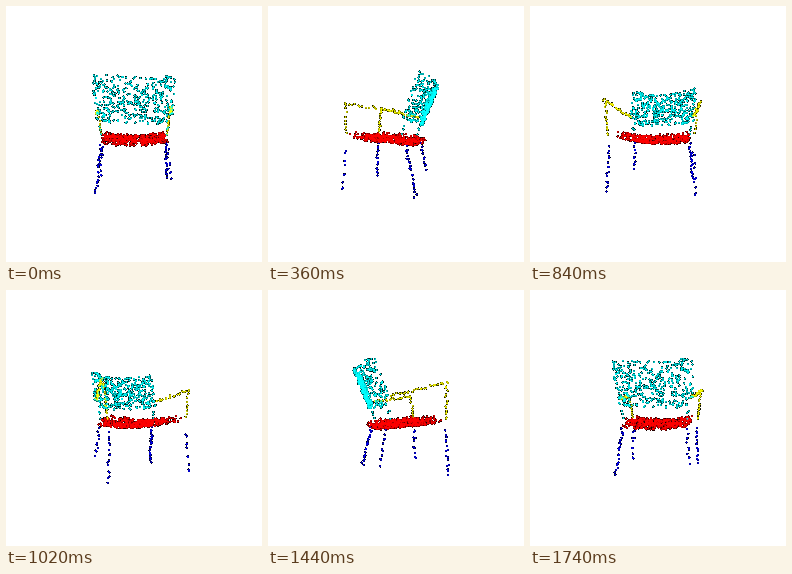
A matplotlib script that plays this animation: 256x256 px, repeating every 1.8 s.

```python
import numpy as np
import matplotlib.pyplot as plt
from matplotlib.animation import FuncAnimation

SIZE, FRAMES, STEP = 256, 30, 60
DIST = 3.0
FOCAL = SIZE / 2 / np.tan(np.radians(30))
RADIUS = 0.01 * SIZE / 2

CYAN, RED, BLUE, YELLOW = (0, 1, 1), (1, 0, 0), (0, 0, 1), (1, 1, 0)
rng = np.random.default_rng(7)


def backrest(n):
    """Tilted panel, curved forward at both sides."""
    u = rng.uniform(-1, 1, n)
    low = 0.118 + 0.09 * u**6
    high = 0.65 + 0.04 * u**2
    y = low + (high - low) * rng.random(n)
    w = 0.343 + 0.41 * (y - 0.117) - 0.16 * u**2
    return np.c_[0.487 * u, y, w + rng.uniform(-0.015, 0.015, n)]


def seat(n):
    """Slab that sags in the middle and slopes down to the back."""
    u = rng.uniform(-1, 1, n)
    v = rng.random(n)
    top = -0.065 * v + 0.05 * u**2
    y = top - 0.095 * rng.random(n)
    return np.c_[(0.44 - 0.03 * v) * u, y, -0.47 + 0.8 * v]


def rod(n, start, end, reach=1.0, thick=0.016):
    """Points scattered along a thin bar, up to a share of its length."""
    t = reach * (np.arange(n) + rng.random(n))[:, None] / n
    line = np.array(start) + np.subtract(end, start) * t
    return line + rng.uniform(-thick, thick, (n, 3))


def side_parts(s):
    """Legs, armrest and back support of one side (s is -1 or 1)."""
    arm_front = (0.575 * s, 0.385 + 0.03 * s, -0.44)
    arm_back = (0.46 * s, 0.25, 0.22)
    post_foot = (0.5 * s, -0.02, -0.46)
    yield BLUE, rod(13 + 3 * s, (0.5 * s, -0.15, -0.47), (0.52 * s, -0.7, -0.5))
    yield BLUE, rod(18 - 7 * s, (0.41 * s, -0.14, 0.25),
                    (0.45 * s, -0.7, 0.38), 0.85 - 0.15 * s)
    yield YELLOW, rod(24 + 4 * s, arm_back, arm_front)
    yield YELLOW, rod(13 + 4 * s, arm_front, post_foot)
    yield CYAN, rod(3, (0.42 * s, 0.1, 0.23), (0.42 * s, 0, 0.21))


parts = [(CYAN, backrest(400)), (RED, seat(470)),
         *side_parts(-1), *side_parts(1)]
points = np.vstack([p for _, p in parts])
colors = np.vstack([np.tile(np.array(c, float), (len(p), 1)) for c, p in parts])


def render(i):
    """Splat soft discs back to front over black; untouched pixels stay white."""
    a = 2 * np.pi * i / FRAMES
    x, y, w = points.T
    depth = DIST - (w * np.cos(a) - x * np.sin(a))
    px = SIZE / 2 + FOCAL * (x * np.cos(a) + w * np.sin(a)) / depth
    py = SIZE / 2 - FOCAL * y / depth
    image = np.zeros((SIZE, SIZE, 3))
    hit = np.zeros((SIZE, SIZE), bool)
    offsets = np.arange(-2, 3)
    for k in np.argsort(-depth):
        col, row = int(px[k]), int(py[k])
        dx = col + offsets + 0.5 - px[k]
        dy = row + offsets + 0.5 - py[k]
        alpha = 1 - (dx[None, :]**2 + dy[:, None]**2) / RADIUS**2
        alpha = np.clip(alpha, 0, 1)
        box = np.s_[row - 2:row + 3, col - 2:col + 3]
        hit[box] |= alpha > 0
        image[box] += alpha[..., None] * (colors[k] - image[box])
    image[~hit] = 1
    return image


fig = plt.figure(figsize=(SIZE / 100, SIZE / 100), dpi=100, facecolor="white")
ax = fig.add_axes([0, 0, 1, 1])
ax.axis("off")
view = ax.imshow(render(0), interpolation="nearest", aspect="auto")


def update(i):
    view.set_data(render(i))
    return [view]


anim = FuncAnimation(fig, update, frames=FRAMES, interval=STEP,
                     repeat=True, repeat_delay=0)
plt.show()
```
